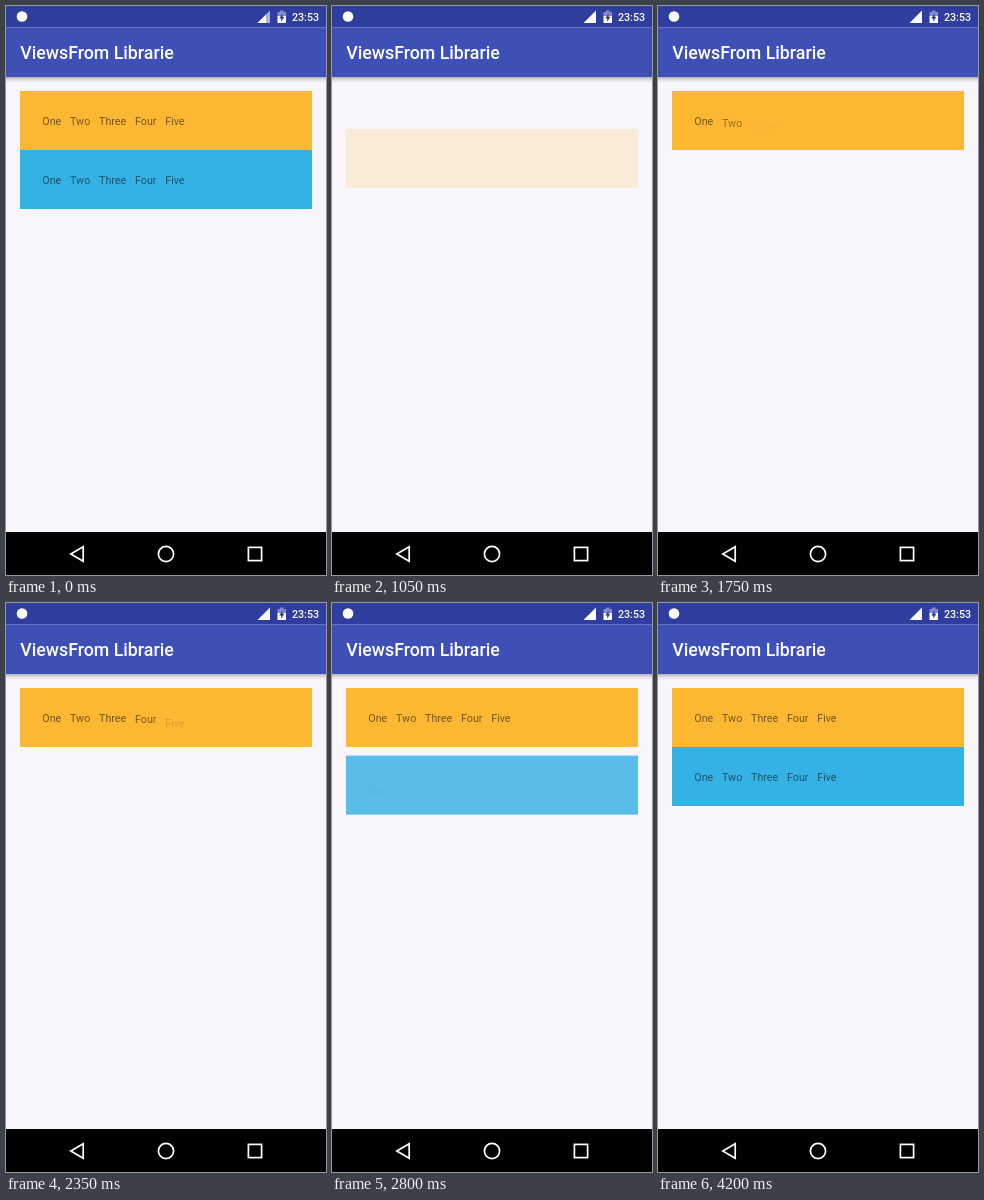
An HTML page with a canvas that plays this animation: 320x569 px, repeating every 4.25 s.

```html
<!DOCTYPE html>
<html lang="en">
<head>
<meta charset="utf-8">
<title>Staggered rows</title>
<style>
  html, body { margin: 0; width: 100%; height: 100%; overflow: hidden; background: #f8f6fa; }
  canvas { display: block; width: 320px; height: 569px; }
</style>
</head>
<body>
<canvas id="stage" width="320" height="569"></canvas>
<script>
const ctx = document.getElementById('stage').getContext('2d');

const LOOP = 4250, TICK = 50;
const RESTART = 900, FIRST = 910, STAGGER = 255.3, DURATION = 500;
const ROW_H = 59, ROW_SHIFT = 46.5, WORD_SHIFT = 5.6, WORD_GAP = 8.89;
const BAR = '#2f3e9e';
const WORDS = ['One', 'Two', 'Three', 'Four', 'Five'];
const ROWS = [
  { y: 85, color: '#fdb833' },
  { y: 144, color: '#34b2e6' }
];

function rect(color, x, y, w, h) {
  ctx.fillStyle = color;
  ctx.fillRect(x, y, w, h);
}

function polygon(points) {
  ctx.beginPath();
  points.forEach(([x, y]) => ctx.lineTo(x, y));
  ctx.closePath();
}

function text(str, x, y, size, weight, color) {
  ctx.font = `${weight} ${size}px Roboto, sans-serif`;
  ctx.fillStyle = color;
  ctx.fillText(str, x, y);
}

// Eased progress of the n-th view in the staggered sequence
function progress(n, t) {
  if (t < RESTART) return 1;
  const p = Math.min(1, Math.max(0, (t - FIRST - n * STAGGER) / DURATION));
  return (1 - Math.cos(p * Math.PI)) / 2;
}

function drawSignal(weak) {
  ctx.fillStyle = weak ? 'rgba(255,255,255,.6)' : '#fff';
  polygon([[251.5, 17], [264, 17], [264, 4.5]]);
  ctx.fill();
  if (weak) {
    ctx.fillStyle = '#fff';
    polygon([[251.5, 17], [260, 17], [260, 8.5]]);
    ctx.fill();
  }
}

function drawBattery() {
  const dim = 'rgba(255,255,255,.4)';
  rect(dim, 274, 4.5, 3.5, 1.5);
  rect(dim, 271.5, 6, 8.5, 4);
  rect('#fff', 271.5, 10, 8.5, 7);
  ctx.fillStyle = BAR;
  polygon([[276.6, 7.2], [273.2, 12.4], [275.2, 12.4], [275.2, 15.8], [278.4, 10.8], [276.6, 10.8]]);
  ctx.fill();
}

function drawHeader(t) {
  rect(BAR, 0, 0, 320, 21.5);
  rect('#3e50b5', 0, 21.5, 320, 49.5);
  const shadow = ctx.createLinearGradient(0, 71, 0, 77);
  shadow.addColorStop(0, 'rgba(0,0,0,.28)');
  shadow.addColorStop(.5, 'rgba(0,0,0,.09)');
  shadow.addColorStop(1, 'rgba(0,0,0,0)');
  rect(shadow, 0, 71, 320, 6);

  ctx.fillStyle = '#fff';
  ctx.beginPath();
  ctx.arc(16, 10.5, 5.3, 0, 7);
  ctx.fill();
  drawSignal(t < 750);
  drawBattery();
  text('23:53', 286, 15, 10.67, 500, '#fff');
  text('ViewsFrom Librarie', 14.2, 53, 17.78, 500, '#fff');
}

function drawNav() {
  rect('#000', 0, 526, 320, 43);
  ctx.strokeStyle = '#fff';
  ctx.lineWidth = 1.7;
  polygon([[64.8, 548], [77.2, 540.7], [77.2, 555.3]]);
  ctx.stroke();
  ctx.beginPath();
  ctx.arc(160, 548, 7.6, 0, 7);
  ctx.stroke();
  ctx.strokeRect(242.4, 541.4, 13.2, 13.2);
}

function drawRow({ y, color }, first, t) {
  const shown = progress(first, t);
  const top = y + (1 - shown) * ROW_SHIFT;
  ctx.globalAlpha = shown;
  rect(color, 14, top, 292, ROW_H);

  let x = 36.3;
  WORDS.forEach((word, i) => {
    const p = progress(first + 1 + i, t);
    ctx.globalAlpha = shown * p;
    text(word, x, top + 34.3 + (1 - p) * WORD_SHIFT, 10.67, 400, 'rgba(0,0,0,.54)');
    x += ctx.measureText(word).width + WORD_GAP;
  });
  ctx.globalAlpha = 1;
}

function frame(now) {
  const t = Math.floor(now % LOOP / TICK) * TICK;
  rect('#f8f6fa', 0, 0, 320, 569);
  ROWS.forEach((row, i) => drawRow(row, i * (WORDS.length + 1), t));
  drawHeader(t);
  drawNav();
  requestAnimationFrame(frame);
}

requestAnimationFrame(frame);
</script>
</body>
</html>
```
